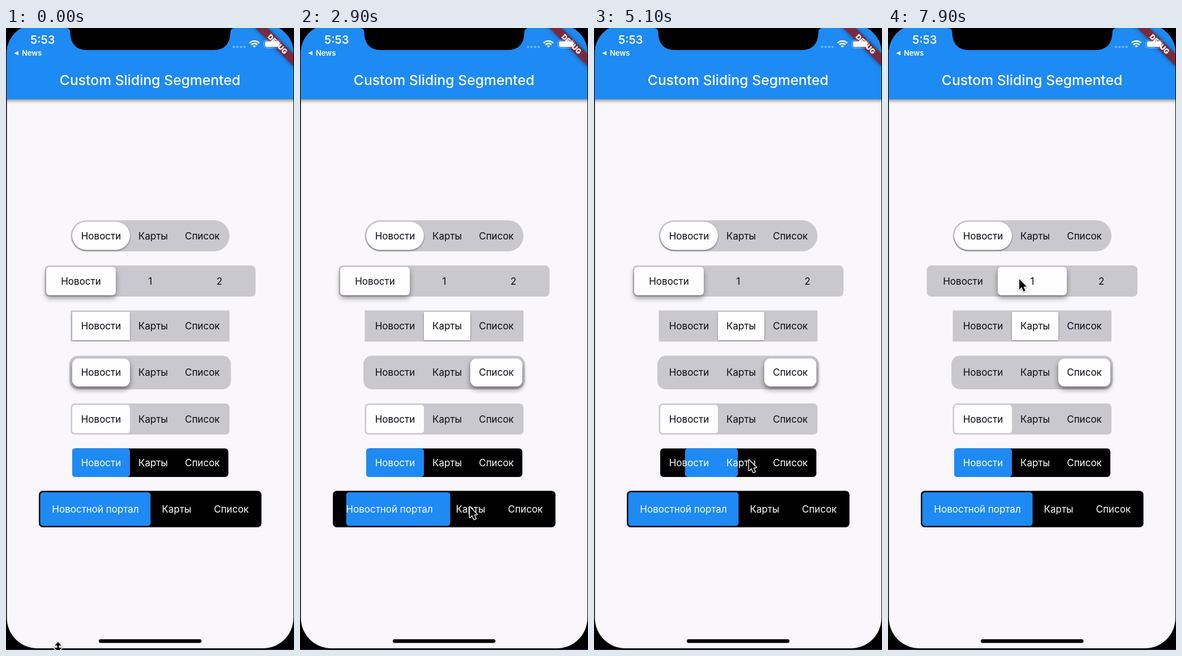
An HTML page with a canvas for the animation above (8000 ms loop, 509 px wide and 1100 px high).

```html
<!DOCTYPE html>
<html lang="ru">
<head>
<meta charset="utf-8">
<title>Custom Sliding Segmented</title>
<style>
  html, body { margin: 0; width: 100%; height: 100%; overflow: hidden; background: #000; }
  canvas { display: block; }
</style>
</head>
<body>
<canvas id="stage" width="509" height="1100"></canvas>
<script>
const ctx = document.getElementById('stage').getContext('2d');
const LOOP = 8000, STEP = 100, SLIDE = 200;
const BLUE = '#1e8af3', GREY = '#c9c8cf', WHITE = '#fefdff', BLACK = '#000';
const WORDS = ['Новости', 'Карты', 'Список'];
const EDGES = [117, 219, 301, 393];

// track: x, y, w, h, radius; pad: gap around the thumb; shadow: blur, dy, alpha
const light = { fill: GREY, thumb: WHITE, ink: '#0a0a0c', words: WORDS, edges: EDGES };
const dark = { fill: BLACK, thumb: BLUE, ink: '#fff', words: WORDS, edges: EDGES };
const rows = [
  { ...light, track: [114.5, 340, 280.5, 55, 27.5], pad: 2.5, radius: 25, shadow: [3, 1.5, .45] },
  { ...light, track: [68.5, 420, 372.5, 55, 8], pad: 2.5, radius: 6, shadow: [10, 5, .42],
    words: ['Новости', '1', '2'], edges: [71, 194, 316, 438.5] },
  { ...light, track: [114.5, 499.5, 280.5, 55, 0], pad: 2.5, radius: 0, shadow: [3, 1.2, .42] },
  { ...light, track: [112, 579.5, 285.5, 59.5, 15], pad: 5, radius: 11, shadow: [10, 5, .48] },
  { ...light, track: [114.5, 664, 280.5, 55, 7], pad: 2.5, radius: 5 },
  { ...dark, track: [117, 743.5, 276, 50.5, 6], pad: 0, radius: 5 },
  { ...dark, track: [58, 818.5, 393.5, 64.5, 7], pad: 2.5, radius: 5,
    words: ['Новостной портал', 'Карты', 'Список'], edges: [60.5, 255.5, 347.5, 449] },
];

// time, row, chosen segment
const taps = [
  [1120, 3, 1], [1600, 3, 2], [1950, 2, 1], [2850, 6, 1], [3550, 6, 2], [4300, 6, 0],
  [4982, 5, 1], [5520, 5, 0], [6050, 0, 1], [6620, 0, 0], [7450, 1, 1],
];

// time, x, y of the pointer tip
const route = [
  [0, 92, 1090], [750, 262, 612], [1000, 260, 594], [1200, 260, 597], [1520, 345, 605],
  [1680, 345, 605], [2000, 257, 508], [2200, 257, 508], [2750, 300, 847], [2950, 300, 847],
  [3400, 388, 851], [3650, 388, 851], [4200, 165, 848], [4350, 165, 848], [4900, 274, 764],
  [5150, 274, 764], [5450, 168, 768], [5600, 168, 768], [6000, 281, 378], [6150, 281, 378],
  [6530, 170, 374], [6700, 170, 374], [7350, 232, 444], [8000, 232, 444],
];

const mix = (a, b, k) => a + (b - a) * k;
const clamp = v => Math.max(0, Math.min(1, v));
const smooth = k => k * k * (3 - 2 * k);

function box(x, y, w, h, r, fill) {
  ctx.beginPath();
  ctx.roundRect(x, y, w, h, r);
  ctx.fillStyle = fill;
  ctx.fill();
}

function text(str, x, y, font, fill, align = 'center') {
  ctx.font = font + ' Inter, sans-serif';
  ctx.textAlign = align;
  ctx.fillStyle = fill;
  ctx.fillText(str, x, y);
}

function shade(blur, dy, alpha) {
  ctx.shadowBlur = blur;
  ctx.shadowOffsetY = dy;
  ctx.shadowColor = `rgba(0,0,0,${alpha})`;
}

function polygon(points) {
  ctx.beginPath();
  points.forEach(([x, y]) => ctx.lineTo(x, y));
  ctx.closePath();
}

function thumbSpan(index, t) {
  const { edges } = rows[index];
  let left = edges[0], right = edges[1];
  for (const [start, row, choice] of taps) {
    if (row !== index || t < start) continue;
    const k = clamp((t - start) / SLIDE) ** 1.6;
    left = mix(left, edges[choice], k);
    right = mix(right, edges[choice + 1], k);
  }
  return [left, right];
}

function drawRow(row, index, t) {
  const [x, y, w, h, r] = row.track;
  const [left, right] = thumbSpan(index, t);
  box(x, y, w, h, r, row.fill);
  ctx.save();
  if (row.shadow) shade(...row.shadow);
  box(left, y + row.pad, right - left, h - 2 * row.pad, row.radius, row.thumb);
  ctx.restore();
  row.words.forEach((word, i) =>
    text(word, (row.edges[i] + row.edges[i + 1]) / 2, y + h / 2 + 6, '400 17px', row.ink));
}

function drawStatus() {
  text('5:53', 43, 28, '600 20px', '#fff', 'left');
  text('News', 28, 49, '600 13px', '#fff', 'left');
  polygon([[14.5, 44.5], [22, 40.8], [22, 48.2]]);
  ctx.fill();
  for (let i = 0; i < 4; i++) box(401 + i * 6.2, 31.5, 4, 4, 1.5, 'rgba(255,255,255,.35)');
  ctx.strokeStyle = '#fff';
  ctx.lineWidth = 2.7;
  for (const radius of [12, 7.6, 2.7]) {
    ctx.beginPath();
    ctx.arc(439, 35, radius, -Math.PI * .75, -Math.PI * .25);
    ctx.stroke();
  }
  ctx.lineWidth = 1.2;
  ctx.strokeStyle = 'rgba(255,255,255,.4)';
  ctx.beginPath();
  ctx.roundRect(456, 21.5, 29, 14, 4.5);
  ctx.stroke();
  box(458, 23.5, 25, 10, 2.5, '#fff');
}

function drawBanner() {
  ctx.save();
  ctx.translate(480, 28.5);
  ctx.rotate(Math.PI / 4);
  ctx.save();
  shade(7, 0, .5);
  box(-70, -7.4, 140, 14.8, 0, '#782b3e');
  ctx.restore();
  text('DEBUG', 0, 4.5, '900 12.5px', '#fff');
  ctx.restore();
}

function drawNotch() {
  ctx.beginPath();
  ctx.moveTo(106, 0);
  ctx.quadraticCurveTo(113, 0, 113.5, 8);
  ctx.bezierCurveTo(114, 28, 124, 39, 143, 39);
  ctx.lineTo(367, 39);
  ctx.bezierCurveTo(386, 39, 396, 28, 396.5, 8);
  ctx.quadraticCurveTo(397, 0, 404, 0);
  ctx.fillStyle = BLACK;
  ctx.fill();
}

function drawPointer(t) {
  const next = Math.max(1, route.findIndex(p => p[0] > t));
  const [t0, x0, y0] = route[next - 1], [t1, x1, y1] = route[next];
  const k = smooth(clamp((t - t0) / (t1 - t0)));
  ctx.save();
  ctx.translate(mix(x0, x1, k), mix(y0, y1, k));
  if (t < STEP) {
    polygon([[0, -4], [6, 2], [1.5, 2], [1.5, 6], [7, 6], [0, 13],
             [-7, 6], [-1.5, 6], [-1.5, 2], [-6, 2]]);
  } else {
    polygon([[0, 0], [0, 18.5], [4.2, 14.6], [7.6, 22], [10.8, 20.6], [7.5, 13.6], [13, 13.2]]);
  }
  ctx.lineJoin = 'round';
  ctx.lineWidth = 2.6;
  ctx.strokeStyle = '#fff';
  shade(3, 1, .4);
  ctx.stroke();
  ctx.shadowColor = 'transparent';
  ctx.fillStyle = BLACK;
  ctx.fill();
  ctx.restore();
}

function draw(t) {
  box(0, 0, 509, 1100, 0, BLACK);
  box(0, 1098, 509, 2, 0, '#171926');
  ctx.save();
  ctx.beginPath();
  ctx.roundRect(1.5, -6, 506.5, 1103, [50, 50, 54, 54]);
  ctx.clip();
  box(0, 0, 509, 1100, 0, '#f9f7fb');
  ctx.save();
  shade(6, 2.5, .42);
  box(-10, -10, 529, 136, 0, BLUE);
  ctx.restore();
  text('Custom Sliding Segmented', 254.5, 100.5, '500 24.7px', '#fff');
  rows.forEach((row, i) => drawRow(row, i, t));
  box(164, 1081, 181.5, 6.5, 3.25, BLACK);
  drawBanner();
  drawStatus();
  ctx.restore();
  drawNotch();
  drawPointer(t);
}

function tick() {
  const t = performance.now() % LOOP;
  draw(Math.floor(t / STEP) * STEP);
  requestAnimationFrame(tick);
}
tick();
</script>
</body>
</html>
```
